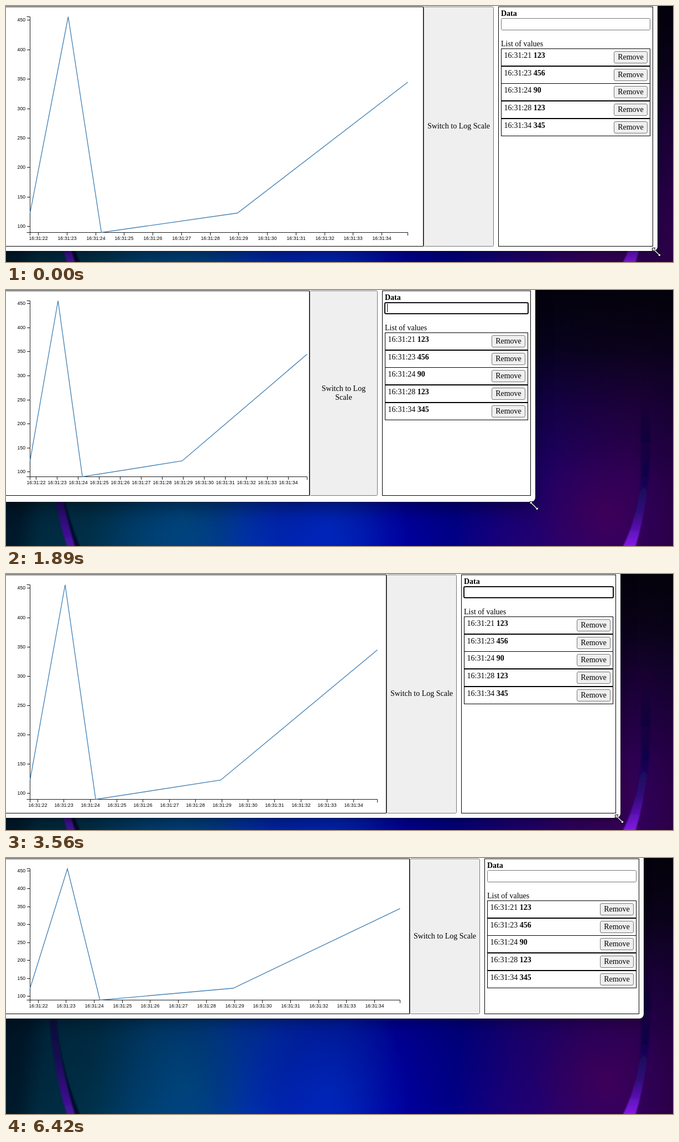
An HTML page that plays this animation: 1206 px wide and 464 px high, repeating every 6.44 s.

```html
<!DOCTYPE html>
<html lang="en">
<head>
<meta charset="utf-8">
<title>Resizable chart</title>
<style>
html, body { margin: 0; width: 100%; height: 100%; overflow: hidden; background: #000; }
#stage { position: relative; width: 1206px; height: 464px; overflow: hidden; }
#stage > * { position: absolute; left: 0; top: 0; }
#wall {
  width: 1206px; height: 464px;
  background:
    linear-gradient(rgba(2,2,8,.97), rgba(3,3,14,.85) 22%, rgba(2,2,18,.46) 46%, rgba(0,0,16,.12) 72%, transparent),
    radial-gradient(ellipse 130px 130px at 1085px 400px, #44005ccc, #3a006080 50%, transparent),
    radial-gradient(ellipse 110px 200px at 320px 410px, #00487ccc, #00407060 55%, transparent),
    radial-gradient(ellipse 150px 190px at 580px 430px, #0026bc, #0020b080 55%, transparent),
    linear-gradient(97deg, #001320, #001a2c 6%, #002a40 9%, #003048 16%, #004074 25%, #003c94 33%,
      #002cac 42%, #001cb2 51%, #0000a4 59%, #000088 68%, #1a0078 76%,
      #2c0068 85%, #34005c 92%, #2a0052 96%, #2c0046);
}
#win {
  left: -20px; background: #fff; border-radius: 0 0 8px 0;
  box-shadow: 0 0 0 1px rgba(0,0,0,.35), 0 12px 30px rgba(0,0,0,.36);
}
#win.idle { box-shadow: 0 0 0 1px rgba(0,0,0,.3), 0 5px 16px rgba(0,0,0,.28); }
text { font: 14px "Liberation Serif", "Times New Roman", serif; white-space: pre; }
.b { font-weight: bold; }
.mid { text-anchor: middle; }
.axis text { font: 8.75px "Liberation Sans", Arial, sans-serif; }
.axis path { fill: none; stroke: #000; stroke-width: .9; }
.box { fill: none; stroke: #000; }
.btn { fill: #efefef; stroke: #767676; }
</style>
</head>
<body>
<div id="stage">
  <div id="wall"></div>
  <svg width="1206" height="464">
    <defs>
      <linearGradient id="left" x2="0" y2="1">
        <stop stop-color="#05072a"/><stop offset=".5" stop-color="#160850"/><stop offset="1" stop-color="#4b14a6"/>
      </linearGradient>
      <linearGradient id="right" x2="0" y2="1">
        <stop stop-color="#06062a" stop-opacity="0"/><stop offset=".5" stop-color="#10064a"/>
        <stop offset=".75" stop-color="#300878"/><stop offset="1" stop-color="#8c1cf6"/>
      </linearGradient>
      <filter id="soft"><feGaussianBlur stdDeviation="1.2"/></filter>
    </defs>
    <g filter="url(#soft)">
      <path fill="#06082e" d="M88 250Q92 370 136 470H118Q82 370 80 250Z"/>
      <path fill="url(#left)" d="M78 250Q80 375 112 470H126Q94 370 87 250Z"/>
      <path fill="url(#right)" d="M1148 205Q1160 190 1163 215Q1173 350 1137 470H1113Q1154 390 1148 290Z"/>
    </g>
  </svg>
  <div id="win"></div>
  <svg id="ui" width="1206" height="464"></svg>
</div>
<script>
const LOOP = 6440, FIRST = 515, STEP = 135;
const $ = id => document.getElementById(id);

// drag of the window corner: time, right edge, bottom edge
const DRAG = [
  [380, 1178, 444], [1055, 1081, 393], [1190, 1048, 393], [1740, 957, 372],
  [2270, 957, 424], [2540, 957, 444], [2700, 957, 444], [3215, 1123, 443],
  [3350, 1111, 442], [3485, 1111, 442], [4295, 1194, 455], [4430, 1191, 457],
  [4700, 1135, 433], [4835, 1147, 369], [4970, 1151, 326], [5105, 1164, 308], [5375, 1153, 291]
];
// seconds after 16:31, value
const DATA = [[21.71, 123], [23.043, 456], [24.203, 90], [28.957, 123], [34.908, 345]];

function sizeAt(t) {
  const i = DRAG.findIndex(k => k[0] > t);
  const [t0, w0, h0] = DRAG.at(i < 0 ? -1 : i - 1);
  if (i < 0) return [w0, h0];
  const [t1, w1, h1] = DRAG[i], p = (t - t0) / (t1 - t0);
  return [w0 + (w1 - w0) * p, h0 + (h1 - h0) * p];
}

// Every repaint keeps part of the previous chart size: the plot overflows
// by up to 24 px when the window shrinks and falls short when it grows.
const layouts = [];
for (let t = FIRST - STEP, spill = 0, last = sizeAt(t); t < LOOP; t += STEP) {
  const [w, h] = sizeAt(t), dw = w - last[0], dh = h - last[1];
  spill = Math.min(24, Math.max(0, spill) - dw);
  layouts.push({ w, h, dw, dh, gap: 28 - spill });
  last = [w, h];
}

// boxes take pixel columns and rows, both ends included
const box = (cls, x, y, x2, y2, r = 0) =>
  `<rect class="${cls}" x="${x + .5}" y="${y + .5}" width="${x2 - x}" height="${y2 - y}" rx="${r}"/>`;
const text = (s, x, y, cls = '') => `<text class="${cls}" x="${x}" y="${y}">${s}</text>`;

function chart(right, bottom, axisX, axisY) {
  const px = s => 43.5 + (s - 21.71) / 13.198 * (axisX - 43);
  const py = v => 19.5 + (456 - v) / 366 * (axisY - 19);
  const base = axisY + .5;
  let d = `M37.5 19.5H43.5V${base}H37.5M43.5 ${base + 5.5}V${base}H${axisX + .5}v5.5`;
  let labels = '';
  for (let v = 100; v <= 450; v += 50) {
    const y = Math.round(py(v) - .5) + .5;
    d += `M38.2 ${y}H43.5`;
    labels += `<text x="35.2" y="${y + 2.8}" text-anchor="end">${v}</text>`;
  }
  for (let s = 22; s <= 34; s++) {
    const x = Math.round(px(s) - .5) + .5;
    d += `M${x} ${base}v5.3`;
    labels += text('16:31:' + s, x, base + 13.5, 'mid');
  }
  const line = DATA.map(([s, v]) => px(s) + ',' + py(v)).join(' ');
  return `<clipPath id="plot"><rect width="${right}" height="${bottom}"/></clipPath>
    <g class="axis" clip-path="url(#plot)"><path d="${d}"/>${labels}
    <polyline points="${line}" fill="none" stroke="steelblue" stroke-width="1.35"/></g>`
    + box('box', -2, 1, right, bottom);
}

function switchButton(left, right, bottom, wrapped) {
  const x = (left + right + 1) / 2, y = Math.floor(bottom / 2 + 5);
  return box('btn', left, 1, right, bottom, 2) + (wrapped
    ? text('Switch to Log', x, y - 8, 'mid') + text('Scale', x, y + 8, 'mid')
    : text('Switch to Log Scale', x, y, 'mid'));
}

function panel(left, right, bottom, focused, caret) {
  const x = left + 5, x2 = right - 5;
  let out = box('box', left, 1, right, bottom) + text('Data', x, 18, 'b');
  out += focused
    ? `<rect x="${x}" y="23" width="${x2 - x + 1}" height="20" rx="2" fill="#fff" stroke="#101010" stroke-width="2"/>`
    : `<rect x="${x + .5}" y="22.5" width="${x2 - x}" height="21" rx="2" fill="#fff" stroke="#767676"/>`;
  if (caret) out += `<rect x="${left + 9}" y="25" width="1" height="15"/>`;
  out += text('List of values', x, 73);
  DATA.forEach(([s, v], i) => {
    const y = Math.round(77 + 31.7 * i), y2 = Math.round(77.1 + 31.7 * (i + 1)) - 1;
    out += box('box', x, y, x2, y2)
      + text(`16:31:${Math.floor(s)} <tspan class="b">${v}</tspan>`, x + 5.5, y + 17)
      + box('btn', right - 70, y + 5, right - 10, y + 26, 2.5)
      + text('Remove', right - 39.5, y + 20, 'mid');
  });
  return out;
}

const pointer = (x, y) => `<path transform="translate(${x} ${y})" fill="#fff" stroke="#000"
  d="M-7.5-7.5H-2L-4-5.5 5.5 4 7.5 2V7.5H2L4 5.5-5.5-4-7.5-2Z"/>`;

function draw({ w, h, dw, dh, gap }, focused, caret, dragging) {
  const wrapped = gap < 10;
  // the page trails slightly behind the window frame
  const right = Math.round(w - 9 + Math.max(0, -dw - 10) * .17);
  const bottom = Math.round(h - 9 + Math.max(-3, Math.min(2, -dh * .3)));
  const squeeze = (right - 948) / 95;
  const panelL = Math.round(right - (wrapped ? 268.5 + 6 * squeeze : 279));
  const buttonR = panelL - 9;
  const chartR = Math.round(buttonR - (wrapped ? 123.5 + 2.5 * squeeze : 127));

  $('win').style.width = w + 20 + 'px';
  $('win').style.height = h + 'px';
  $('win').className = focused || dragging ? '' : 'idle';
  $('ui').innerHTML =
    chart(chartR, bottom, Math.round(chartR - gap), Math.round(h - dh - 34))
    + switchButton(chartR + 1, buttonR, bottom, wrapped)
    + panel(panelL, right, bottom, focused, caret)
    + (dragging ? pointer(w - 2 + dw * .15, h + 2 + dh * .4) : '');
}

let shown = '';
const start = performance.now();
function frame() {
  const t = (performance.now() - start) % LOOP;
  const n = Math.max(0, Math.floor((t - FIRST) / STEP) + 1);
  const focused = t >= FIRST && t < 6420;
  const caret = focused && (t + 230) % 1000 < 500;
  const dragging = t < 5895;
  const key = [n, focused, caret, dragging].join();
  if (key !== shown) draw(layouts[n], focused, caret, dragging);
  shown = key;
  requestAnimationFrame(frame);
}
frame();
</script>
</body>
</html>
```
